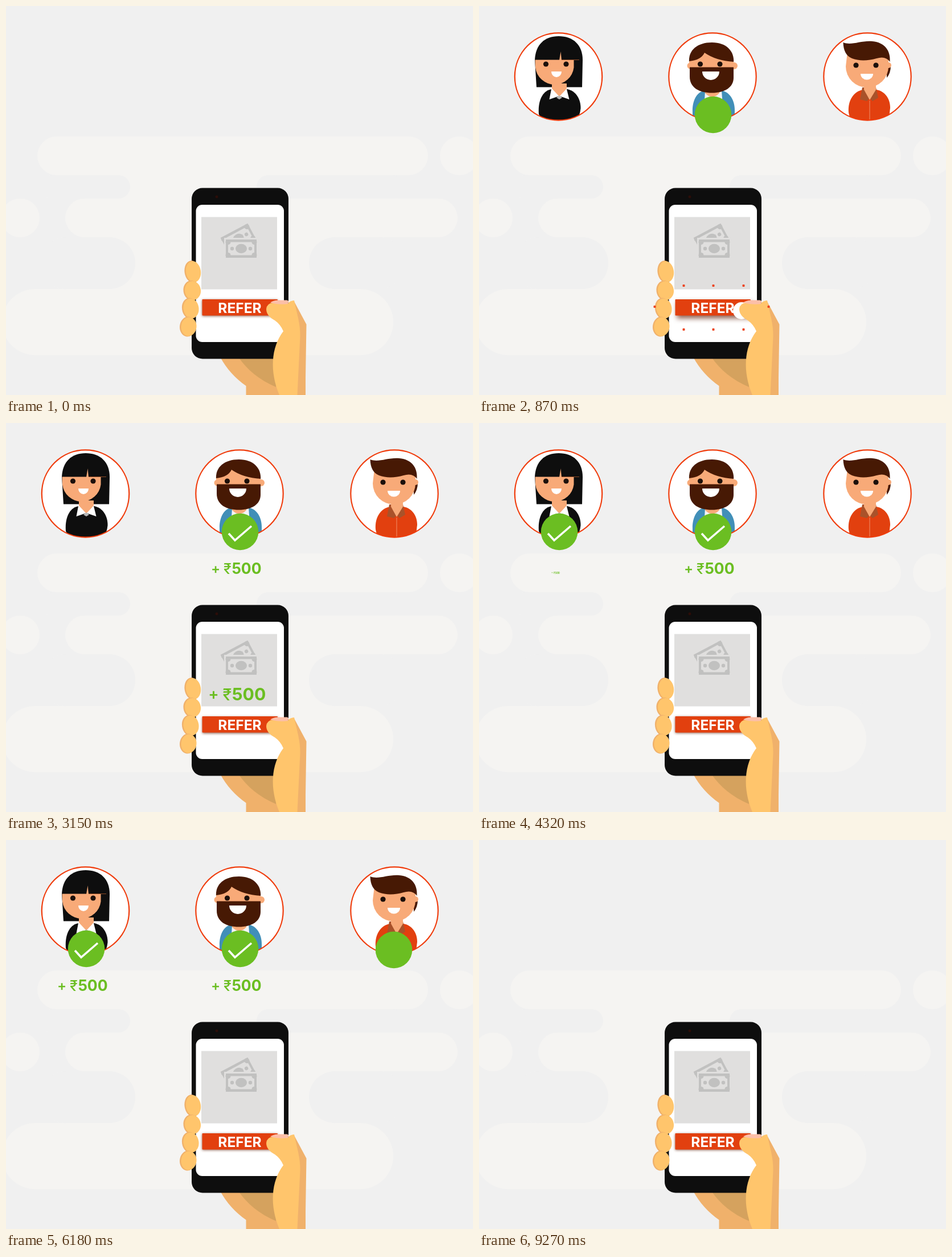
Write an HTML page with a canvas that moves like this. It is 820 px wide and 683 px high and loops after 9.48 s.

```html
<!DOCTYPE html>
<html lang="en">
<head>
<meta charset="utf-8">
<title>Refer and earn</title>
<style>
html, body { margin: 0; width: 100%; height: 100%; overflow: hidden; background: #f0f0f0; }
canvas { display: block; }
</style>
</head>
<body>
<canvas id="stage" width="820" height="683"></canvas>
<script>
const ctx = document.getElementById('stage').getContext('2d');
const LOOP = 9480, STEP = 30, PERIOD = 2550, OUT = 8460;
const BG = '#f0f0f0', CLOUD = '#f5f4f2', RED = '#e2400f', GREEN = '#6bbe22';
const SKIN = '#f8aa78', BROWN = '#471904', INK = '#0e0e0e';
const HAND = '#ffc56c', HAND_DARK = '#f0b16b', GREY = '#e0dfde', ICON = '#c1c1c0';
const FONT = 'Inter, "Open Sans", sans-serif';

// Eased interpolation through [time, value] pairs
function key(t, stops) {
  if (t <= stops[0][0]) return stops[0][1];
  for (let i = 1; i < stops.length; i++) {
    const [t1, v1] = stops[i], [t0, v0] = stops[i - 1];
    if (t < t1) {
      const k = (t - t0) / (t1 - t0);
      return v0 + (v1 - v0) * (1 - Math.cos(Math.PI * k)) / 2;
    }
  }
  return stops[stops.length - 1][1];
}
const ramp = (t, a, b) => Math.max(0, Math.min(1, (t - a) / (b - a)));

function shape(d, color) {
  ctx.fillStyle = color;
  ctx.fill(new Path2D(d));
}
function box(x0, y0, x1, y1, r, color) {
  ctx.fillStyle = color;
  ctx.beginPath();
  ctx.roundRect(x0, y0, x1 - x0, y1 - y0, r);
  ctx.fill();
}
function oval(x, y, rx, ry, color, tilt = 0) {
  ctx.fillStyle = color;
  ctx.beginPath();
  ctx.ellipse(x, y, rx, ry, tilt, 0, 7);
  ctx.fill();
}
const dot = (x, y, r, color) => oval(x, y, r, r, color);
function scaled(x, y, s, draw) {
  if (s <= 0.005) return;
  ctx.save();
  ctx.translate(x, y);
  ctx.scale(s, s);
  draw();
  ctx.restore();
}

function backdrop() {
  ctx.fillStyle = BG;
  ctx.fillRect(0, 0, 820, 683);
  box(55, 229, 741, 297, 34, CLOUD);
  box(104, 338, 793, 406, 34, CLOUD);
  box(-7, 497, 680, 613, 58, CLOUD);
  dot(796, 263, 34, CLOUD);
  dot(25, 372, 34, CLOUD);
  box(180, 280, 480, 350, 0, CLOUD);
  box(170, 390, 590, 510, 0, CLOUD);
  box(60, 297, 218, 338, 20.5, BG);
  box(440, 297, 700, 338, 20.5, BG);
  box(60, 406, 227, 497, 45.5, BG);
  box(532, 406, 700, 497, 45.5, BG);
}

function smile(x, y, rx, ry) {
  ctx.fillStyle = '#fff';
  ctx.beginPath();
  ctx.ellipse(x, y, rx, ry, 0, 0, Math.PI);
  ctx.fill();
}
function eyes(x0, x1, y) {
  dot(x0, y, 4.6, '#1c100b');
  dot(x1, y, 4.6, '#1c100b');
}

function woman() {
  shape('M98 95C99 68 115 53 140 53C165 53 182 68 182 95L181 142.500H101Z', INK);
  shape('M105 190C103 166 112 148 128 146H155C171 149 179 165 178.500 180Q177 195 168 204H113Z', INK);
  shape('M127 146L123.500 164L141 158L158.500 164L154 146Z', '#fff');
  shape('M128 136H154V145L141 159L128 145Z', SKIN);
  shape('M98.500 94.500H166.500V108A34 34 0 0 1 99 108Z', SKIN);
  shape('M141 95L143.500 80L145 95Z', SKIN);
  shape('M145 94H176V95H145Z', '#8c4a26');
  shape('M136 161L141 157L146 161L141 164Z', '#b9b9b9');
  eyes(117.5, 153, 102);
  smile(136, 115, 9, 10);
}

function beardMan() {
  shape('M375 188C374 165 383 150 398 148H425C441 151 449 166 449 183V204H375Z', '#418fb8');
  shape('M397 148H426L430 204H394Z', '#f4f5f6');
  shape('M397 145H422V153Q410 166 397 153Z', SKIN);
  dot(371, 105, 5.5, SKIN);
  dot(448, 105, 6, SKIN);
  shape('M369 99C367 77 384 64 409 64C434 64 449 79 447 100Z', BROWN);
  shape('M369 97Q390 95 396 82Q416 96 447 98V109H369Z', SKIN);
  shape('M370 107.500H447V126C447 143 431 152.500 409 152.500C386 152.500 370 143 370 124Z', BROWN);
  eyes(388.5, 423, 102);
  smile(407, 115, 15, 15);
}

function youngMan() {
  shape('M649 187C647 165 659 149 675 147H698C714 150 722 164 722 179L719 204H653Z', RED);
  shape('M673 143L669 164L681 167L686 162L691 167L701 161L697 143Z', '#a9522a');
  shape('M676 136H697V147L686 165L676 147Z', SKIN);
  shape('M685.500 166H686.500V202H685.500Z', '#f0906a');
  shape('M716 96L723 104Q723 118 716 126Z', BROWN);
  dot(719, 104, 5, SKIN);
  shape('M647 80H719V106A37.500 37 0 0 1 644 106Z', SKIN);
  shape('M639.500 64C654 70 671 60 691 62C712 64 723 78 721.500 98Q714 87 698 92C684 96 668 97 655 92Q640 86 639.500 64Z', BROWN);
  eyes(662, 697, 104);
  smile(681, 119, 11, 10.5);
}

function avatar(x, draw, s) {
  scaled(x, 124, s, () => {
    ctx.save();
    ctx.beginPath();
    ctx.arc(0, 0, 77, 0, 7);
    ctx.fillStyle = '#fff';
    ctx.fill();
    ctx.clip();
    ctx.translate(-x, -124);
    draw();
    ctx.restore();
    ctx.strokeStyle = '#f03c0c';
    ctx.lineWidth = 2.2;
    ctx.beginPath();
    ctx.arc(0, 0, 76.7, 0, 7);
    ctx.stroke();
  });
}

// Check mark grows along its two strokes
function badge(x, y, s, k) {
  scaled(x, y, s, () => {
    dot(0, 0, 32.3, GREEN);
    if (k <= 0) return;
    const a = Math.min(1, k / 0.3), b = ramp(k, 0.3, 1);
    ctx.strokeStyle = '#fff';
    ctx.lineWidth = 3.6;
    ctx.beginPath();
    ctx.moveTo(-20, 3);
    ctx.lineTo(-20 + 11 * a, 3 + 12 * a);
    if (b > 0) ctx.lineTo(-9 + 29 * b, 15 - 25 * b);
    ctx.stroke();
  });
}

function reward(x, y, s) {
  scaled(x, y, s, () => {
    ctx.fillStyle = GREEN;
    ctx.textAlign = 'center';
    ctx.font = '600 24px ' + FONT;
    ctx.fillText('+', -36.5, -1);
    ctx.font = '500 25px ' + FONT;
    ctx.fillText('₹', -15.5, 0);
    ctx.font = '700 26.5px ' + FONT;
    ctx.fillText('500', 18, 0);
  });
}

function bill(x, y, tilt) {
  ctx.save();
  ctx.translate(x, y);
  ctx.rotate(tilt);
  box(-27, -16, 27, 16, 0, ICON);
  box(-23, -11.5, 23, 11.5, 0, GREY);
  for (const sx of [-1, 1]) {
    for (const sy of [-1, 1]) dot(sx * 23, sy * 11.5, 4.5, ICON);
    dot(sx * 16, 0, 3.2, ICON);
  }
  oval(0, 0, 10, 8.2, ICON);
  ctx.restore();
}

function palm() {
  shape('M376 616C387 637 403 654 421.500 667V683H526V600Z', HAND_DARK);
  shape('M408 616C423 639 446 657 474 669V616Z', '#d5a25e');
}

function phone() {
  box(326, 319.500, 496, 619.500, 19, INK);
  dot(370, 335, 2.5, '#2b0d08');
  box(333.500, 349, 488, 590, 11, '#fff');
  box(343, 370.500, 476, 497.500, 0, GREY);
  bill(408, 408.500, -0.49);
  box(383, 407, 443, 445, 0, GREY);
  bill(413, 426, 0);
}

function button(lift) {
  ctx.save();
  ctx.shadowColor = 'rgba(110,45,25,0.75)';
  ctx.shadowBlur = 4 + 5 * lift;
  ctx.shadowOffsetX = 3 * lift;
  ctx.shadowOffsetY = 1 + 4 * lift;
  box(344.500, 515, 477, 543.500, 1, RED);
  ctx.restore();
  ctx.fillStyle = '#fff';
  ctx.textAlign = 'center';
  ctx.font = '700 24.5px ' + FONT;
  ctx.fillText('REFER', 410.5, 538.5);
}

function thumb() {
  shape('M505 517L527.500 559L525.500 683H508L510 560Z', HAND_DARK);
  shape('M457 532Q458 522 469 521L494 523Q499 517 506 517C511 541 517 558 516.500 580L511.500 683H480C463 642 465 600 487 571Q482 559 472 552Q457 544 457 532Z', HAND);
  shape('M464 521Q468 517 477 516.500H493Q498 517 495 523Q479 525 464 521Z', '#fcbfa8');
}

function fingers() {
  const tips = [[329, 466.5, 13.5, 19.5], [328, 499.5, 14.5, 17.5], [325, 531, 14, 18.5], [321, 563, 14, 17.5]];
  tips.forEach(([x, y, rx, ry], i) => {
    const tilt = i < 3 ? -0.15 : 0.1;
    oval(x - 2, y, rx, ry, HAND_DARK, tilt);
    oval(x, y, rx - 0.5, ry - 1, HAND, tilt);
  });
}

function burst(p) {
  const k = 1 - (1 - ramp(p, 600, 870)) ** 3;
  const size = key(p, [[600, 0], [680, 8], [870, 4], [960, 0]]);
  if (size < 0.1) return;
  const put = (dx, dy) => box(411.5 + dx * k - size / 2, 530 + dy * k - size / 2,
    411.5 + dx * k + size / 2, 530 + dy * k + size / 2, size / 4, '#ec4620');
  for (const dx of [-52, 0, 53]) {
    put(dx, -39);
    put(dx, 38);
  }
  put(-103, -2);
  put(97, -2);
}

const avatarScale = t => key(t, [[30, 0], [240, 1.54], [420, 0.88], [540, 1.04], [660, 1]]);

function render(t) {
  const phase = [0, 1, 2].map(i => t - i * PERIOD);
  const leave = 1 - ramp(t, OUT, OUT + 210);
  const pop = t < OUT ? avatarScale(t) : avatarScale(9270 - t);
  backdrop();
  avatar(139.5, woman, pop);
  avatar(410, beardMan, pop);
  avatar(682, youngMan, pop);

  const spots = [[411, 191], [141, 191], [681, 193]];
  spots.forEach(([x, y], i) => {
    const p = phase[i];
    badge(x, y, leave * key(p, [[660, 0], [780, 1.15], [870, 1]]), ramp(p, 1110, 1410));
    const grow = p < 1920 ? ramp(p, 1740, 1920) * 1.04 : key(p, [[1920, 1.04], [2010, 1]]);
    reward(x - 6.5, y + 73.5, leave * (p < 1800 ? ramp(p, 1740, 1920) : grow));
  });

  palm();
  phone();
  for (const p of phase) {
    reward(406, 486.500, 1.14 * key(p, [[1860, 0], [2010, 1.05], [2100, 1], [3210, 1], [3360, 0]]));
  }
  const taps = phase.map(p => key(p, [[570, 0], [690, 1], [870, 1], [990, 0]]));
  const press = Math.max(...taps);
  button(press);
  if (press > 0.01) dot(461, 535, 15 * press, '#fff');
  thumb();
  fingers();
  phase.forEach(burst);
}

const start = performance.now();
function tick() {
  const t = (performance.now() - start) % LOOP;
  render(Math.floor(t / STEP) * STEP);
  requestAnimationFrame(tick);
}
tick();
</script>
</body>
</html>
```
